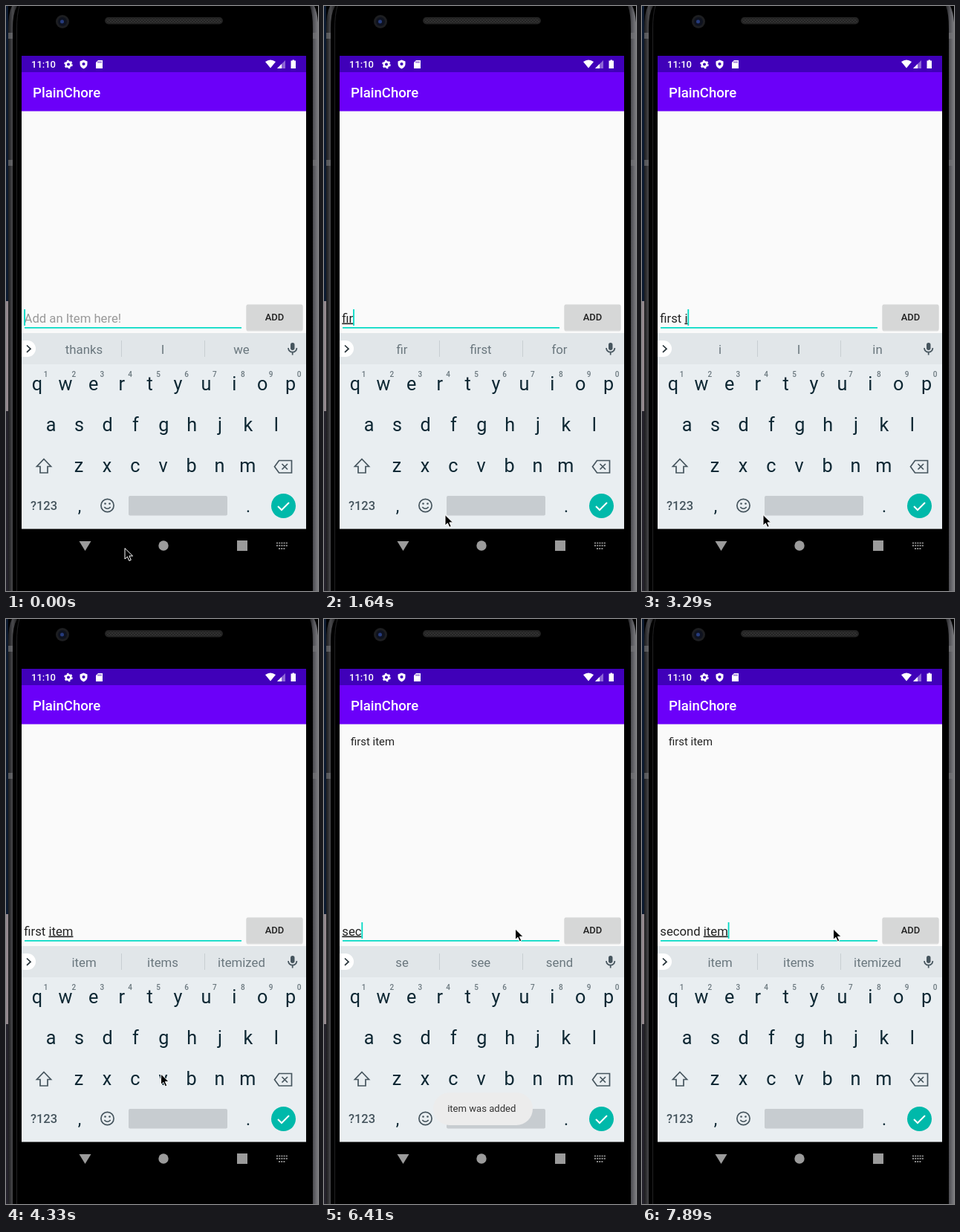
Recreate the animation shown at these times as an HTML page. Size 420 by 787 pixels, loop 8 s.

```html
<!DOCTYPE html>
<html lang="en">
<head>
<meta charset="utf-8">
<title>Todo app demo</title>
<style>
html, body { margin: 0; width: 100%; height: 100%; overflow: hidden; background: #000; }
svg { display: block; width: 420px; height: 787px; font-family: Roboto, sans-serif; }
text { white-space: pre; }
.mid { text-anchor: middle; }
.bold { font-weight: 500; }
.line { fill: none; stroke: #46555e; stroke-width: 1.7; }
#word { text-decoration: underline 1px; text-decoration-skip-ink: none; }
</style>
</head>
<body>
<svg viewBox="0 0 420 787">
  <defs>
    <linearGradient id="rimLeft">
      <stop offset="0" stop-color="#1c1c1e"/><stop offset=".5" stop-color="#4a4a4d"/>
      <stop offset="1" stop-color="#202022"/>
    </linearGradient>
    <linearGradient id="rimRight">
      <stop offset="0" stop-color="#202022"/><stop offset=".5" stop-color="#55555a"/>
      <stop offset="1" stop-color="#7c7c80"/>
    </linearGradient>
    <pattern id="mesh" width="4" height="4" patternUnits="userSpaceOnUse">
      <path d="M0 0h2v2h-2zM2 2h2v2h-2z" fill="#313131"/>
    </pattern>
  </defs>

  <!-- desktop edge and phone body -->
  <rect width="420" height="787"/>
  <path d="M0 0h3v397h-3z" fill="#0c1a30"/>
  <path d="M0 397h3v148h-3z" fill="#94898f"/>
  <path d="M0 545h3v242h-3z" fill="#24222b"/>
  <path d="M3 787V30Q3 10 8 0h7Q9 10 9 30V787z" fill="url(#rimLeft)"/>
  <path d="M420 787V22Q419 8 415 0h-6Q413 10 413 30V787z" fill="url(#rimRight)"/>
  <path d="M14.500 787V30Q14.500 12 18 0" fill="none" stroke="#222224"/>
  <path d="M3 36h6v8h-6zM3 207h6v8h-6zM413 36h7v8h-7zM413 207h7v8h-7z" fill="#77777a" opacity=".6"/>
  <circle cx="76" cy="21" r="9" fill="#1d1e21"/>
  <circle cx="76" cy="21" r="6" fill="#0e121f"/>
  <circle cx="75.500" cy="21" r="2.500" fill="#263b7c"/>
  <rect x="133" y="15" width="159" height="9.500" rx="4.700" fill="#232323"/>
  <rect x="135" y="17" width="155" height="6" rx="3" fill="url(#mesh)"/>

  <!-- app -->
  <path d="M21 67h383v22h-383z" fill="#4000b9"/>
  <path d="M21 141h383v299h-383z" fill="#fafafa"/>
  <path d="M21 89h383v52.500h-383z" fill="#6b00f9"/>
  <g fill="#fff">
    <text class="bold" x="34" y="83" font-size="13">11:10</text>
    <text class="bold" x="36" y="123" font-size="18.600">PlainChore</text>
    <circle cx="84" cy="78.500" r="3.300" fill="none" stroke="#fff" stroke-width="2.600"/>
    <circle cx="84" cy="78.500" r="5" fill="none" stroke="#fff" stroke-width="1.600" stroke-dasharray="2.600 2.636"/>
    <path d="M104.500 72.500l5 2v3.500q0 4-5 6.500q-5-2.500-5-6.500v-3.500z"/>
    <circle cx="104.500" cy="78" r="2.100" fill="#4000b9"/>
    <path d="M124 73h6v11h-9v-8z"/>
    <path d="M124 74.500v2M126 74.500v2M128 74.500v2" stroke="#4000b9"/>
    <path d="M349 75q7-5 14 0l-7 8.500z"/>
    <path d="M376 73v11h-11z" opacity=".4"/><path d="M371 78v6h-6z"/>
    <path d="M385.500 72.500h2.500v1h2v10.500h-6.500v-10.500h2z"/>
  </g>
  <text id="item" x="36" y="169.500" font-size="14.900" fill="#222">first item</text>
  <path d="M25 432h292v1.800h-292z" fill="#03dac5"/>
  <text id="hint" x="24.500" y="425.500" font-size="16.700" fill="#999">Add an Item here!</text>
  <text id="input" x="24.300" y="425.500" font-size="16.700" fill="#222"><tspan id="done"></tspan><tspan id="word"></tspan></text>
  <rect id="caret" y="408" width="1.800" height="22" fill="#03dac5"/>
  <rect id="shadow" x="323.500" y="402.500" width="76" height="35" rx="2"/>
  <rect id="button" x="323.500" y="401.500" width="76" height="34.500" rx="2"/>
  <text class="mid bold" x="361.500" y="423.300" font-size="13" fill="#222">ADD</text>

  <!-- keyboard -->
  <path d="M21 440h383v42h-383z" fill="#e1e6e9"/>
  <path d="M21 482h383v221.500h-383z" fill="#e9eef1"/>
  <path d="M21 450h8a11 11 0 0 1 0 22h-8z" fill="#fff"/>
  <path d="M28 456.500l5 4.700l-5 4.700" class="line" style="stroke:#263238"/>
  <path d="M155.500 450v22M267.500 450v22" stroke="#c8ced2"/>
  <g id="tips" class="mid" font-size="16.800" fill="#6a777e">
    <text x="105" y="467.500"></text><text x="211" y="467.500"></text><text x="317" y="467.500"></text>
  </g>
  <rect x="383" y="453" width="5.500" height="10" rx="2.700" fill="#46555e"/>
  <path d="M380 460a5.700 5.700 0 0 0 11.400 0M385.700 466v3.500" class="line"/>
  <g id="keys" class="mid"></g>
  <path d="M51 609.500l9.500 10h-4.500v8.500h-10v-8.500h-4.500z" class="line"/>
  <path d="M367.500 611.500h17v16.500h-17l-6-8.200zM371.500 616l7.500 7.500M379 616l-7.500 7.500" class="line"/>
  <circle cx="136.500" cy="672" r="8.600" class="line"/>
  <path d="M132.300 674q4.200 4.500 8.400 0" class="line"/>
  <circle cx="133.500" cy="669.500" r="1.300" fill="#46555e"/>
  <circle cx="139.500" cy="669.500" r="1.300" fill="#46555e"/>
  <rect x="165" y="659" width="133" height="26.500" rx="2" fill="#c7ccd0"/>
  <circle cx="373.500" cy="672.500" r="16.500" fill="#00b9aa"/>
  <path d="M366 673l5 5l10-10" fill="none" stroke="#fff" stroke-width="2"/>
  <g id="toast">
    <rect x="147" y="637" width="134" height="44" rx="22" fill="#ececec"/>
    <text class="mid" x="212.300" y="663.300" font-size="13.100" fill="#333">item was added</text>
  </g>

  <!-- navigation bar -->
  <g fill="#9b9b9b">
    <path d="M98.500 720h16l-8 13z"/><circle cx="212" cy="726" r="6.700"/><path d="M311 719h14v14h-14z"/>
    <path d="M364 722.500h15M364 726h15M367 730h9" stroke="#8a8a8a" stroke-width="2" stroke-dasharray="2 1.200"/>
  </g>
  <path id="pointer" d="M0 0v14.500l3.400-3.200l2.400 5.500l2.500-1.100l-2.400-5.300h4.700z" stroke="#fff"/>
</svg>
<script>
const $ = id => document.getElementById(id);
const LOOP = 8000, STEP = 149, PRESSED = 36, ADDED = 37, TOAST_END = 51;

// [step, typed text, word suggestions]
const typing = [
  [0, "", "thanks I we"],
  [8, "f", "f for from"],
  [9, "fi", "fi first find"],
  [11, "fir", "fir first for"],
  [12, "firs", "fir first for"],
  [13, "firs", "firs first firstly"],
  [16, "first", "first firsts firsthand"],
  [19, "first ", "time of day"],
  [22, "first i", "i I in"],
  [23, "first it", "it its it's"],
  [24, "first ite", "ite item items"],
  [25, "first item", "item items itemized"],
  [ADDED, "", "thanks I we"],
  [41, "s", "s so see"],
  [42, "se", "se see send"],
  [43, "sec", "se see send"],
  [44, "seco", "sec second seconds"],
  [45, "secon", "second seconds secondary"],
  [46, "second", "second seconds secondary"],
  [49, "second ", "time one half"],
  [50, "second i", "i I in"],
  [51, "second it", "it its it's"],
  [52, "second ite", "ite item items"],
  [53, "second item", "item items itemized"]
];

// [step, x, y]
const moves = [
  [0, 160, 729.5], [1, 162, 748], [2, 163, 716], [3, 163, 684.5], [28, 163, 684.5],
  [29, 208.5, 612], [31, 308, 478], [33, 352, 430], [35, 358.5, 422.5], [37, 358.5, 422.5],
  [40, 257.5, 417], [54, 257.5, 417]
];

function addKey(label, x, y, size, weight = 400, fill = "#0d2733") {
  const key = document.createElementNS("http://www.w3.org/2000/svg", "text");
  const attrs = { x, y, "font-size": size, "font-weight": weight, fill };
  for (const name in attrs) key.setAttribute(name, attrs[name]);
  key.textContent = label;
  $("keys").append(key);
}

[["qwertyuiop", 42, 517], ["asdfghjkl", 60.7, 572], ["zxcvbnm", 98, 627]].forEach(([row, x, y]) =>
  [...row].forEach((letter, i) => addKey(letter, x + i * 37.9, y, 25.2)));
[..."1234567890"].forEach((digit, i) => addKey(digit, 53.5 + i * 37.9, 498.5, 10, 500, "#6a777e"));
addKey("?123", 51, 678, 16.5, 500, "#46555e");
addKey(",", 99, 681, 23);
addKey(".", 326, 681, 23);

function pointerAt(step) {
  const i = moves.findIndex(move => move[0] > step);
  const [s0, x0, y0] = moves[i - 1], [s1, x1, y1] = moves[i];
  const k = (step - s0) / (s1 - s0);
  return [x0 + (x1 - x0) * k, y0 + (y1 - y0) * k];
}

const show = (id, on) => $(id).setAttribute("visibility", on ? "visible" : "hidden");

function draw(time) {
  const step = Math.floor((time + 10) / STEP);
  const [, text, tips] = typing.findLast(entry => entry[0] <= step);
  const [start] = typing.findLast(([at, typed], i) => at <= step && typed !== typing[i - 1]?.[1]);

  const cut = text.lastIndexOf(" ") + 1;
  $("done").textContent = text.slice(0, cut);
  $("word").textContent = text.slice(cut);
  show("hint", !text);
  tips.split(" ").forEach((tip, i) => $("tips").children[i].textContent = tip);

  // the caret blinks every half second and restarts on each key
  const idle = (step - start) * STEP + (start ? 0 : 250);
  show("caret", Math.floor(idle / 500) % 2 === 0);
  $("caret").setAttribute("x", 24.2 + (text ? $("input").getComputedTextLength() : 0));

  const pressed = step === PRESSED;
  $("button").setAttribute("fill", pressed ? "#bababa" : "#d6d7d7");
  $("shadow").setAttribute("opacity", pressed ? .35 : .12);
  show("item", step >= ADDED);
  show("toast", step >= ADDED && step < TOAST_END);
  $("pointer").setAttribute("transform", `translate(${pointerAt(step)})`);
}

function tick() {
  draw(performance.now() % LOOP);
  requestAnimationFrame(tick);
}
tick();
</script>
</body>
</html>
```
